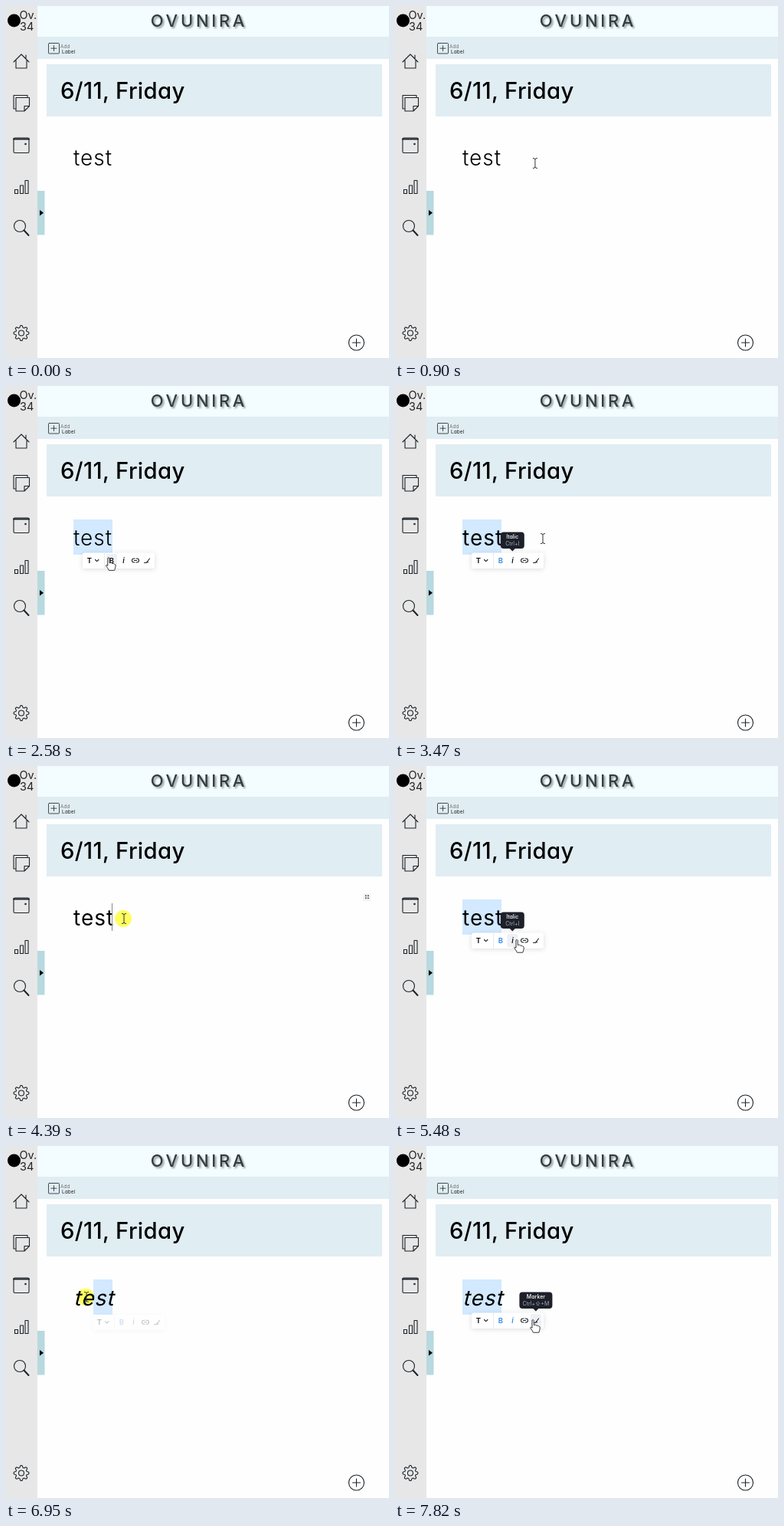
Recreate the animation shown at these times as an HTML page. Size 500x459 px, loop 7.99 s.

```html
<!DOCTYPE html>
<html lang="en">
<head>
<meta charset="utf-8">
<style>
html, body { margin: 0; width: 100%; height: 100%; overflow: hidden; background: #fefefe; }
svg { display: block; width: 500px; height: 459px; }
text { font-family: Inter, "Noto Sans", sans-serif; font-feature-settings: "cv11"; white-space: pre; }
.line { fill: none; stroke: #1c2328; stroke-width: 1.1; stroke-linejoin: round; stroke-linecap: round; }
.mid { text-anchor: middle; }
#brand { font-size: 22px; font-weight: 500; letter-spacing: 3.7px; fill: #333c42; filter: drop-shadow(2px 2px 1px #0006); }
#date { font-size: 29.3px; font-weight: 450; letter-spacing: .35px; }
#word { font-size: 28px; letter-spacing: 1px; }
#bar { filter: drop-shadow(0 1px 3px #0002); }
#tip text { font-size: 7px; }
#press { fill: #ffff60; mix-blend-mode: multiply; }
</style>
</head>
<body>
<svg viewBox="0 0 500 459">
  <rect x="41" width="459" height="40" fill="#f3fdff"/>
  <rect x="41" y="40" width="459" height="29" fill="#e0edf3"/>
  <rect x="53" y="76" width="438" height="68" fill="#e0edf3"/>
  <rect width="41" height="459" fill="#e7e7e7"/>
  <rect x="41" y="241" width="9.5" height="57.5" fill="#b7d9df"/>
  <path d="M44 266l5 3.7-5 3.7z"/>

  <circle cx="10.5" cy="19" r="8.5"/>
  <g font-size="14.500" fill="#222"><text x="17.5" y="17">Ov.</text><text x="18" y="31.5">34</text></g>
  <text id="brand" class="mid" x="252" y="26.5">OVUNIRA</text>

  <g class="line">
    <path d="M10 73l10-10 10 10M13 71v10h14V71M26 68v-4"/>
    <path d="M12 134h-2v-17.500h18v2.500M13 119.500h17.500v11l-6.500 6.500H13zM24 137v-6.500h6.500"/>
    <rect x="10" y="172" width="20" height="19.500" rx="1.500"/>
    <path d="M10 173.500h20" stroke-width="2"/>
    <circle cx="25.500" cy="180" r=".8"/>
    <path d="M11.500 239.500h4v5h-4zM18.500 234h4v10.500h-4zM25 227.500h4v17h-4z"/>
    <circle cx="18" cy="287" r="7.500"/><path d="M23.500 292.500l6 6.500" stroke-width="2"/>
    <path id="gear"/><circle cx="20" cy="426.500" r="3.500"/>
    <circle cx="457.500" cy="439" r="10"/><path d="M452.500 439h10M457.500 434v10"/>
    <g stroke-width=".8"><rect x="55.500" y="48.500" width="14" height="13.500" rx="1"/><path d="M59 55.200h7M62.500 51.700v7"/></g>
  </g>
  <text x="71" y="55" font-size="6.500" fill="#777">Add</text>
  <text x="73" y="61.500" font-size="6.500" fill="#222">Label</text>
  <text id="date" x="71" y="121">6/11, Friday</text>

  <rect id="sel" y="174" width="0" height="46" fill="#d2e9ff"/>
  <text id="word">test</text>
  <path id="caret" d="M138.500 179v36" stroke="#888"/>
  <g id="dots"><rect x="466" y="166" width="10" height="10" rx="2" fill="#eff1f6"/>
    <path d="M469 169.300h5M469 172.300h5" stroke="#333" stroke-width="1.600" stroke-dasharray="1.600 1.400"/></g>

  <g id="bar">
    <rect x="100" y="217.500" width="94" height="20.500" rx="3" fill="#fff"/>
    <rect id="hover" y="219" width="14" height="17" rx="2" fill="#eef0f4"/>
    <path d="M128.500 218v20" stroke="#e8e8eb"/>
    <g class="mid" font-size="9.500" font-weight="600">
      <text x="109" y="231">T</text>
      <text id="bold" x="138" y="231">B</text>
      <text id="ital" x="153.500" y="231" font-style="italic">i</text>
    </g>
    <path class="line" d="M116.500 226.500l2.200 2.200 2.200-2.200"/>
    <path class="line" d="M168 230h-1a2.300 2.300 0 0 1 0-5h1M170 225h1a2.300 2.300 0 0 1 0 5h-1M167.300 227.500h3.400"/>
    <path class="line" d="M180.500 230.500h3l4-5.500M184 229l1.500 1"/>
  </g>
  <g id="tip">
    <path d="M-4 211.500h8l-4 4z" fill="#1d2029"/>
    <rect id="box" y="190.500" height="21.500" rx="4" fill="#1d2029"/>
    <text id="name" class="mid" y="198.500" fill="#fff" font-weight="500"></text>
    <text id="keys" class="mid" y="208" fill="#a6aab8"></text>
  </g>

  <circle id="press" r="11"/>
  <g id="cursor">
    <path id="beam" d="M-3-6.500q3 0 3 1.500 0-1.500 3-1.500M0-5V5M-3 6.500q3 0 3-1.500 0 1.500 3 1.500" fill="none" stroke="#333"/>
    <path id="arrow" d="M0 0v13l3-3 2 5 2-1-2-5h4z" fill="#fff" stroke="#111" stroke-width=".8"/>
    <path id="hand" d="M-1 0q1.500-1 2.300.5v6q3-1 3.500.7 2.500-.5 3 1 1.500 0 1.500 2-.3 3-1.500 6H.5q-1-2.500-4-6 .3-2 2.500 0z" fill="#fff" stroke="#222" stroke-width=".9" stroke-linejoin="round"/>
  </g>
</svg>
<script>
const LOOP = 7990, LEFT = 88, RIGHT = 139, DRAG = 250;
const el = Object.fromEntries([...document.querySelectorAll('[id]')].map(e => [e.id, e]));
const set = (e, attrs) => { for (const k in attrs) e.setAttribute(k, attrs[k]); };
const show = (e, on) => set(e, { opacity: on ? 1 : 0 });
const clamp = v => Math.max(0, Math.min(1, v));

// Each round: drag over the word, then press a toolbar button
const rounds = [
  { grab: 1705, from: 141, to: 72, button: 141, press: 3100 },
  { grab: 4400, from: 154, to: 82, button: 159, press: 5620 },
  { grab: 6790, from: 147, to: 88, button: 180, press: 8000 }
];
const leave = r => r.press + 560;

const buttons = [['Bold', 'B'], ['Italic', 'I'], ['Link', 'K'], ['Marker', '⇧+M']]
  .map(([name, key], i) => ({ name, keys: 'Ctrl+' + key, x: 138 + 15.3 * i, w: key.length > 1 ? 43 : 31 }));

// Pointer stops: time, x, y
const stops = [[130, 470, 470], [880, 183, 205], ...rounds.flatMap(r => [
  [r.grab, r.from, 199],
  [r.grab + DRAG, r.to, 196],
  [r.grab + DRAG + 150, r.to, 200],
  [r.press - 400, r.button, 227],
  [r.press + 60, r.button, 227],
  [r.press + 330, 193, 199],
  [r.press + 420, 193, 199],
  [leave(r), 157, 199]
])];

function pointer(t) {
  const i = Math.max(1, stops.findIndex(p => p[0] > t));
  const [a, b] = [stops[i - 1], stops[i]];
  const u = clamp((t - a[0]) / (b[0] - a[0])), e = u * u * (3 - 2 * u);
  return [a[1] + (b[1] - a[1]) * e, a[2] + (b[2] - a[2]) * e];
}

function hovered(t) {
  const [x, y] = pointer(t);
  return y > 217 && y < 238 && buttons.find(b => Math.abs(x - b.x) < 7.6);
}

// Snaps a drag to the nearest letter edge
const snap = x => [LEFT, 98, 114, 129, RIGHT].reduce((a, b) => Math.abs(b - x) < Math.abs(a - x) ? b : a);

function draw(t) {
  const [x, y] = pointer(t);
  const round = rounds.find(r => t >= r.grab && t < leave(r));

  const start = round ? snap(pointer(Math.min(t - 40, round.grab + DRAG))[0]) : RIGHT;
  set(el.sel, { x: start, width: RIGHT - start });

  const bold = t >= rounds[0].press, italic = t >= rounds[1].press;
  set(el.word, {
    transform: `translate(${LEFT} 208) skewX(${italic ? -14 : 0})`,
    'font-weight': bold ? 400 : 300
  });

  const bar = round ? clamp((t - round.grab - 135) / 100) : 0;
  set(el.bar, { opacity: bar, transform: `translate(${(start - LEFT) / 2} ${3 * (1 - bar)})` });
  set(el.bold, { fill: bold ? '#388ae5' : '#111' });
  set(el.ital, { fill: italic ? '#388ae5' : '#111' });

  const focus = t - rounds[0].grab;
  show(el.caret, start === RIGHT && focus > 50);
  show(el.dots, !bar && focus > 90);

  const over = hovered(t), tip = hovered(t - 230);
  show(el.hover, over);
  if (over) set(el.hover, { x: over.x - 7 });
  show(el.tip, tip && bar);
  if (tip) {
    set(el.tip, { transform: `translate(${tip.x} 0)` });
    set(el.box, { x: -tip.w / 2, width: tip.w });
    el.name.textContent = tip.name;
    el.keys.textContent = tip.keys;
  }

  const overBar = bar && x > 100 && x < 194 && y > 217;
  const overPlus = Math.hypot(x - 457.5, y - 439) < 11;
  const kind = overBar || overPlus ? 'hand' : y > 240 ? 'arrow' : 'beam';
  for (const k of ['hand', 'arrow', 'beam']) show(el[k], k === kind);
  set(el.cursor, { transform: `translate(${x} ${y})` });

  const down = rounds.some(r => Math.abs(t - r.press) < 40 || Math.abs(t - leave(r)) < 40
    || t > r.grab - 20 && t < r.grab + DRAG + 40);
  set(el.press, { cx: x - 1, cy: y });
  show(el.press, down);
}

// Eight-toothed outline
const rim = Array.from({ length: 97 }, (_, i) => {
  const a = i / 96 * 2 * Math.PI, r = 8.6 + Math.max(-1.3, Math.min(1.3, 2 * Math.cos(8 * a)));
  return `${(20 + r * Math.cos(a)).toFixed(2)} ${(426.5 + r * Math.sin(a)).toFixed(2)}`;
});
set(el.gear, { d: `M${rim.join('L')}z` });

const began = performance.now();
function tick() {
  draw((performance.now() - began) % LOOP);
  requestAnimationFrame(tick);
}
tick();
</script>
</body>
</html>
```
